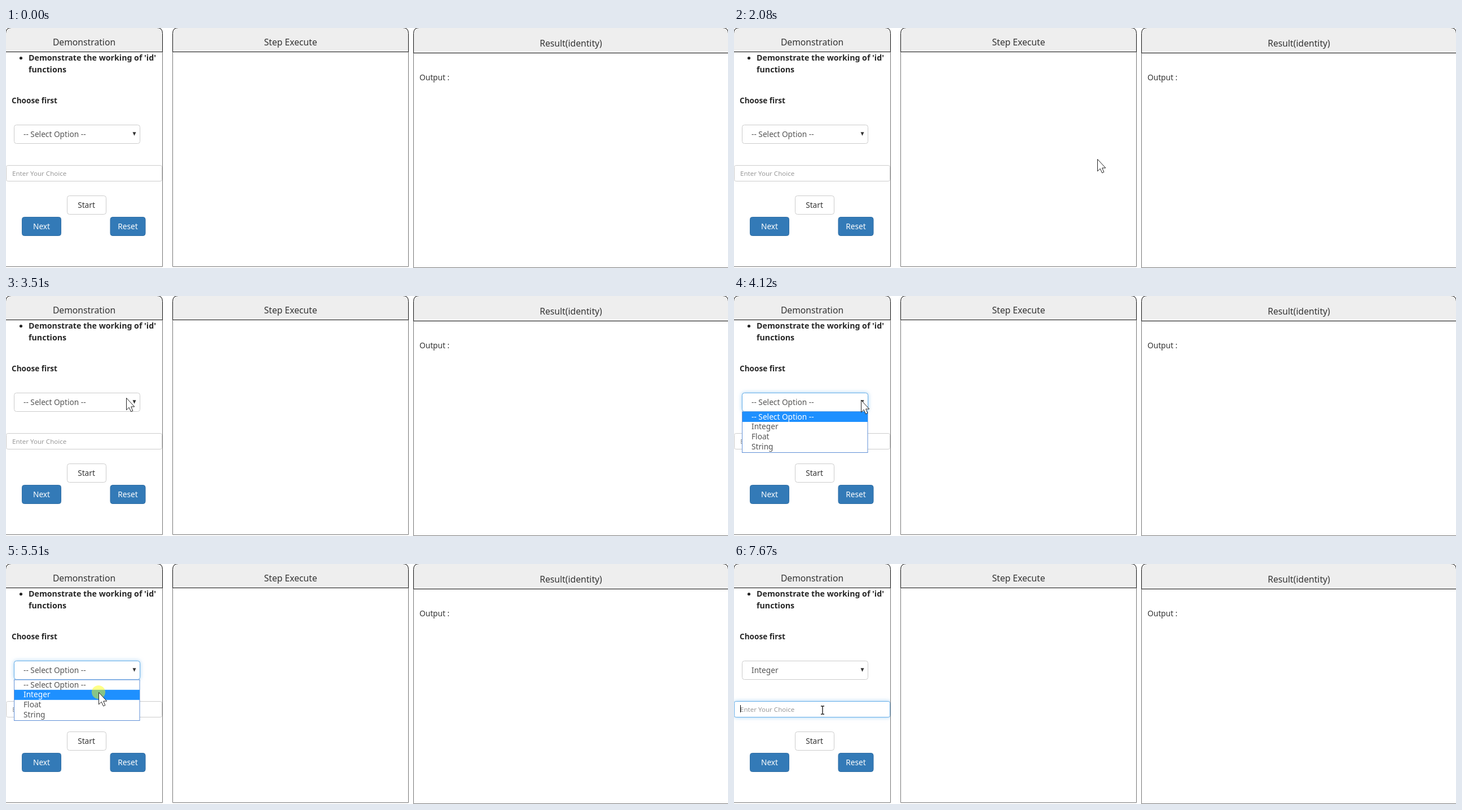
An HTML page for the animation above (8000 ms loop, 1280 px wide and 427 px high).

```html
<!DOCTYPE html>
<html lang="en">
<head>
<meta charset="utf-8">
<title>Identity function demo</title>
<style>
  html, body { margin: 0; width: 100%; height: 100%; overflow: hidden; background: #fff; }
  svg { display: block; }
  text { font-family: "Noto Sans", "Open Sans", sans-serif; font-size: 13.7px; fill: #333; white-space: pre; }
  .mid { text-anchor: middle; }
  .title { font-size: 15.7px; }
  .bold { font-weight: 700; font-size: 14.2px; fill: #262626; }
  .option { fill: #555; }
  .light, .option.picked { fill: #fff; }
  .hint { font-size: 11.55px; fill: #999; }
  .head { fill: #eee; stroke: #111; }
  .edge { fill: none; stroke: #777; }
  .field { fill: #fff; stroke: #ccc; }
  .focus { fill: #fff; stroke: #66afe9; filter: drop-shadow(0 0 3.5px rgba(102, 175, 233, .6)); }
  .primary { fill: #337ab7; stroke: #2e6da4; }
  .menu { fill: #fff; stroke: #5f8fd6; }
  .pick { fill: #1e90ff; }
  .click { fill: rgba(255, 255, 0, .47); }
  [data-on] { visibility: hidden; }
</style>
</head>
<body>
<svg width="1280" height="427" viewBox="0 0 1280 427">
  <g id="panels"></g>
  <text x="733" y="93">Output :</text>

  <circle cx="26.5" cy="53.5" r="2.6" fill="#262626"/>
  <text class="bold" x="40" y="58">Demonstrate the working of 'id'</text>
  <text class="bold" x="40" y="79">functions</text>
  <text class="bold" x="10" y="134" style="font-size:13.6px">Choose first</text>

  <!-- form; the nested viewport clips the focus glow -->
  <svg width="277" height="427">
    <rect class="field" x="14.5" y="172.5" width="223" height="33" rx="4"/>
    <rect class="focus" x="14.5" y="172.5" width="223" height="33" rx="4" data-on="4120 6810"/>
    <text class="option" x="31" y="193.5" data-on="0 5740">-- Select Option --</text>
    <text class="option" x="31" y="193.5" data-on="5740 8000">Integer</text>
    <path d="M224.5 185.3h6l-3 6.4z" fill="#333"/>

    <rect class="field" x=".5" y="244.5" width="276" height="28" rx="3"/>
    <rect class="focus" x=".5" y="244.5" width="276" height="28" rx="3" data-on="6810 8000"/>
    <text class="hint" x="11" y="262.5">Enter Your Choice</text>
    <rect x="11" y="251" width="1" height="13" data-on="6660 7130 7670 8000"/>

    <rect class="field" x="108.5" y="298.5" width="69" height="33" rx="4"/>
    <rect class="primary" x="28.5" y="336.5" width="69" height="33" rx="4"/>
    <rect class="primary" x="185" y="336.5" width="62" height="33" rx="4"/>
    <text class="mid" x="142.5" y="320">Start</text>
    <text class="mid light" x="63" y="358">Next</text>
    <text class="mid light" x="216" y="358">Reset</text>

    <g id="menu" data-on="4120 5740">
      <rect class="menu" x="14.5" y="206" width="222.5" height="72.5"/>
      <rect class="pick" x="15" width="222" height="18"/>
    </g>
  </svg>

  <!-- pointer -->
  <circle class="click" cx="213.5" cy="181" r="12" data-on="3320 3510"/>
  <circle class="click" cx="164" cy="228" r="12" data-on="5510 5660"/>
  <circle class="click" cx="155" cy="259" r="12" data-on="6510 6660"/>
  <g id="pointer">
    <path data-on="1460 6200" fill="#fff" stroke="#222"
      d="M.5.5V21.8L5.2 17.3L8.6 24.8L11.8 23.3L8.7 16H14.8Z"/>
    <path data-on="6200 8000" fill="none" stroke="#222" stroke-width="1.4"
      d="M-3-7.3H-1L0-6.5L1-7.3H3M0-6.5V6.5M-3 7.3H-1L0 6.5L1 7.3H3"/>
  </g>
</svg>
<script>
  const LOOP = 8000;
  const FRAME = 77;
  const ROW = 17.8;
  const HOVER_TIME = 4810;
  const byId = id => document.getElementById(id);

  function add(parent, tag, attrs, text = "") {
    const el = document.createElementNS("http://www.w3.org/2000/svg", tag);
    for (const name in attrs) el.setAttribute(name, attrs[name]);
    el.textContent = text;
    return parent.appendChild(el);
  }

  function addPanel(title, left, right, base) {
    add(byId("panels"), "path", { class: "edge", d: `M${left} ${base}V${base + 382}H${right}V${base}` });
    add(byId("panels"), "path", {
      class: "head",
      d: `M${left} ${base}V9.5q0-10 10-10H${right - 10}q10 0 10 10V${base}Z`
    });
    add(byId("panels"), "text", { class: "mid title", x: (left + right) / 2, y: base - 11.5 }, title);
  }
  addPanel("Demonstration", -0.5, 277.5, 42.5);
  addPanel("Step Execute", 295.5, 713.5, 42.5);
  addPanel("Result(identity)", 722.5, 1280.5, 44.5);

  const menu = byId("menu");
  const pick = menu.querySelector(".pick");
  const options = ["-- Select Option --", "Integer", "Float", "String"].map((label, row) =>
    add(menu, "text", { class: "option", x: 31, y: 219.5 + row * ROW }, label));

  // each glide starts where the one before it ended
  const glides = [
    { start: 1460, end: 1690, x: 873, y: 318 },
    { start: 1930, end: 2160, x: 591, y: 213 },
    { start: 2390, end: 2540, x: 288, y: 130 },
    { start: 2780, end: 3090, x: 213, y: 181 },
    { start: 4120, end: 4120, x: 225, y: 185 },
    { start: 4400, end: 4500, x: 232, y: 190 },
    { start: 4660, end: 4810, x: 183, y: 228 },
    { start: 4890, end: 4970, x: 178, y: 231 },
    { start: 5270, end: 5430, x: 164, y: 228 },
    { start: 6120, end: 6200, x: 157, y: 260 }
  ];

  // slows down slightly and moves once per recorded frame
  function glideProgress({ start, end }, t) {
    const steps = Math.round((end - start) / FRAME) + 1;
    const step = Math.min(steps, Math.floor((t - start) / FRAME + 0.05) + 1);
    return 1 - (1 - step / steps) ** 1.2;
  }

  function pointerAt(t) {
    let x = 1229, y = 464;
    for (const glide of glides) {
      if (t < glide.start) break;
      const p = glideProgress(glide, t);
      x += (glide.x - x) * p;
      y += (glide.y - y) * p;
    }
    return [Math.round(x), Math.round(y)];
  }

  const parts = [...document.querySelectorAll("[data-on]")].map(el => ({
    el, times: el.dataset.on.split(" ").map(Number)
  }));

  // times alternate between on and off, so an odd count passed means visible
  const isOn = (times, t) => times.filter(time => time <= t).length % 2 === 1;

  function draw(t) {
    for (const { el, times } of parts) {
      el.style.visibility = isOn(times, t) ? "visible" : "hidden";
    }
    const picked = t < HOVER_TIME ? 0 : 1;
    pick.setAttribute("y", 206 + picked * ROW);
    options.forEach((el, row) => el.classList.toggle("picked", row === picked));
    byId("pointer").setAttribute("transform", `translate(${pointerAt(t)})`);
  }

  const begin = performance.now();
  function tick() {
    draw((performance.now() - begin) % LOOP);
    requestAnimationFrame(tick);
  }
  tick();
</script>
</body>
</html>
```
